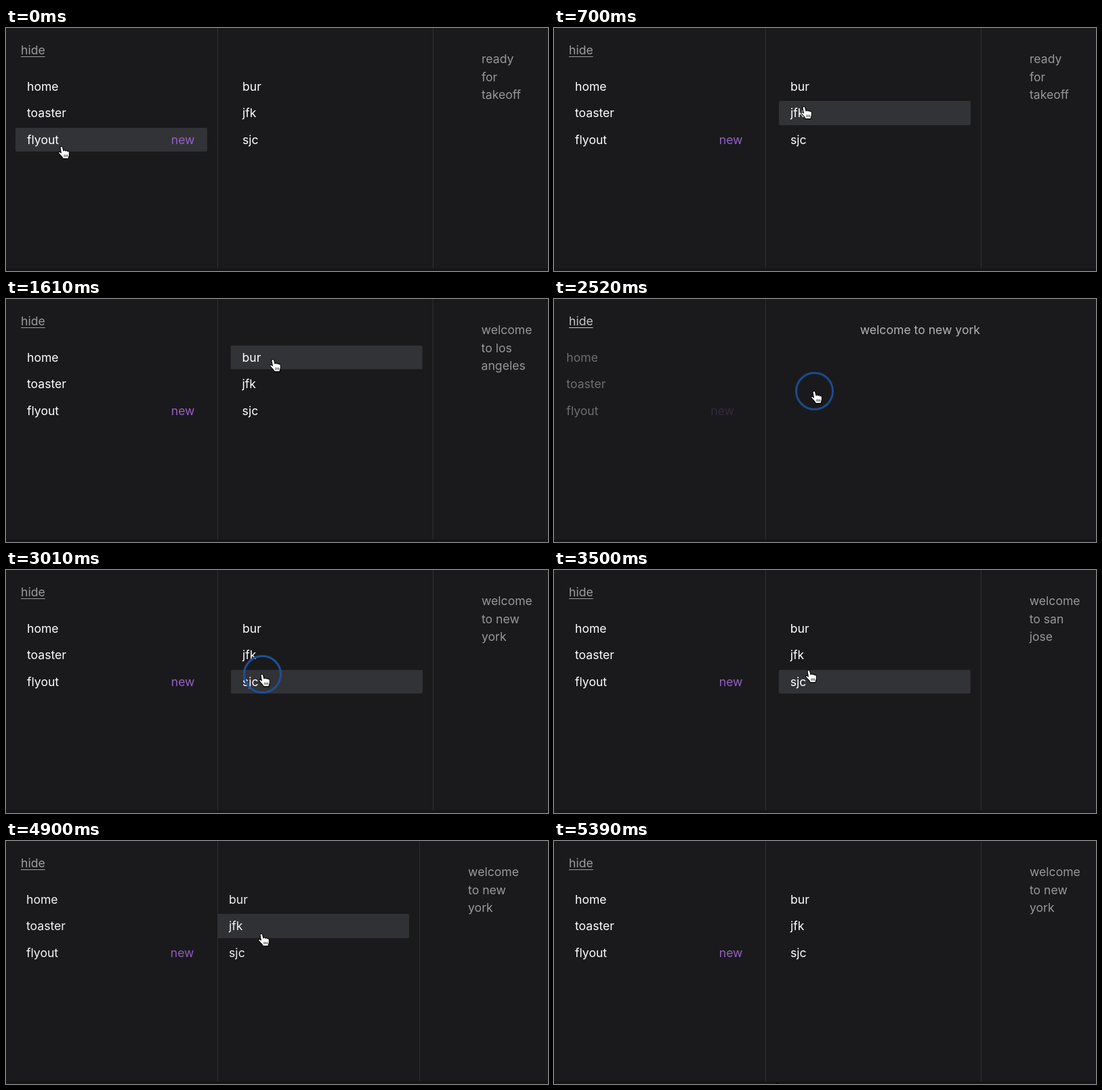
Animation, 800 px wide and 360 px high, one loop 5.46 s. Source, as an HTML page:

```html
<!DOCTYPE html>
<html lang="en">
<head>
<meta charset="utf-8">
<title>Flyout menu</title>
<style>
  html, body { margin: 0; width: 100%; height: 100%; overflow: hidden; background: #1a1a1d; }
  #stage {
    position: relative; width: 800px; height: 360px; overflow: hidden;
    background: #1a1a1d; color: #fff;
    font: 17.6px/26.4px Inter, sans-serif;
  }
  #stage div, #stage svg { position: absolute; }
  #hide { left: 22px; top: 20px; text-decoration: underline; text-underline-offset: 3px; }
  #edge { left: 312px; top: 0; width: 1px; height: 356px; background: #303033; }
  #clip { left: 313px; top: 0; width: 318px; height: 356px; overflow: hidden; }
  #flyout { inset: 0; box-sizing: border-box; border-right: 1px solid #303033; }
  #menu { left: 0; top: 0; width: 312px; height: 356px; }
  .row {
    box-sizing: border-box; width: 282.5px; height: 35.2px; padding: 0 18px 0 17px;
    border-radius: 2px; line-height: 35.2px;
  }
  .row.on { background: #323337; }
  .tag { right: 18px; top: 0; color: #9461c5; }
  #main { top: 33.3px; right: 30px; }
  #foot { left: 0; top: 356px; width: 800px; height: 4px; background: #151517; }
  #ring {
    box-sizing: border-box; width: 57px; height: 57px; margin: -28.5px;
    border: 3.5px solid #1d5098; border-radius: 50%;
  }
  #cursor { left: 0; top: 0; overflow: visible; }
  #cursor path { fill: #fff; stroke: #000; stroke-width: 1.1; stroke-linejoin: round; }
</style>
</head>
<body>
<div id="stage">
  <div id="main"></div>
  <div id="clip"><div id="flyout"></div></div>
  <div id="edge"></div>
  <div id="menu"></div>
  <div id="hide">hide</div>
  <div id="foot"></div>
  <div id="ring"></div>
  <svg id="cursor" width="20" height="22">
    <g id="hand">
      <path d="M-2 1.6C-2.2-.8 1.2-1.2 1.7 1L3 6C3.4 4.6 5.6 4.6 6 6.2C6.6 5 8.4 5.4 8.7 6.8C9.6 6 11.2 6.6 11.3 8.2L11.4 11.5C11.4 13.6 10.2 14.8 10 17.6L2.2 17.6C1.8 15.2-1.8 12.4-4 9.6C-5 8.2-3.2 6.6-1.8 7.8L-.6 9Z"/>
      <path d="M4 11.5V15M6.2 11.5V15M8.4 11.5V15" style="stroke-width:.8"/>
    </g>
    <path id="arrow" d="M0 0V15.5L3.6 12.2L6 17.8L8.5 16.7L6.1 11.3H11Z"/>
  </svg>
</div>
<script>
const LOOP = 5460, SLIDE = 500, PANEL = 317;
const $ = id => document.getElementById(id);

// Each visit: click time and the message it opens.
const visits = [
  [-SLIDE, 'ready for takeoff'],
  [1135, 'welcome to los angeles'],
  [2440, 'welcome to new york'],
  [3020, 'welcome to san jose'],
  [4555, 'welcome to new york']
];

// Pointer tip: time, x, y.
const track = [
  [0, 82, 176], [490, 82, 176], [700, 369, 117], [940, 393, 91], [1050, 394, 90],
  [1680, 394, 90], [2170, 384, 137], [2610, 384, 137], [2900, 378, 155],
  [3400, 378, 155], [3500, 376, 149], [3780, 377, 140], [4060, 377, 140],
  [4200, 377, 138], [5040, 377, 138], [5390, 329, 358], [LOOP, 329, 364]
];

const rows = [];
function addRows(parent, left, names) {
  return names.map((name, i) => {
    const el = document.createElement('div');
    const x = parent === $('flyout') ? left - 313 : left, y = 68.8 + i * 39.65;
    el.className = 'row';
    el.style.left = x + 'px';
    el.style.top = y + 'px';
    el.innerHTML = `<span>${name}</span>`;
    parent.append(el);
    rows.push({ el, left, y, inFlyout: parent === $('flyout') });
    return el;
  });
}
const menuRows = addRows($('menu'), 14, ['home', 'toaster', 'flyout']);
addRows($('flyout'), 332, ['bur', 'jfk', 'sjc']);
const tag = document.createElement('div');
tag.className = 'tag';
tag.textContent = 'new';
menuRows[2].append(tag);
const labels = menuRows.map(el => el.firstChild);

// cubic-bezier(.25, .1, .25, 1)
function ease(x) {
  if (x <= 0) return 0;
  if (x >= 1) return 1;
  const curve = (s, a, b) => 3 * s * (1 - s) * ((1 - s) * a + s * b) + s ** 3;
  let lo = 0, hi = 1;
  for (let i = 0; i < 24; i++) {
    const mid = (lo + hi) / 2;
    if (curve(mid, .25, .25) < x) lo = mid; else hi = mid;
  }
  return curve(lo, .1, 1);
}

function pointer(t) {
  const i = track.findIndex(k => k[0] > t);
  const [t0, x0, y0] = track[i - 1], [t1, x1, y1] = track[i];
  const u = (t - t0) / (t1 - t0), s = u * u * (3 - 2 * u);
  return [x0 + (x1 - x0) * s, y0 + (y1 - y0) * s];
}

function draw(t) {
  const [start, message] = visits.filter(v => v[0] <= t).pop();
  const p = ease((t - start) / SLIDE), rest = 1 - p;
  const [x, y] = pointer(t);

  const main = $('main');
  if (main.textContent !== message) main.textContent = message;
  main.style.left = 702 - PANEL * rest + 'px';
  main.style.color = `rgba(255,255,255,${.55 + .16 * rest})`;
  $('hide').style.color = `rgba(255,255,255,${.57 + .23 * rest})`;

  $('flyout').style.transform = `translateX(${-PANEL * rest}px)`;
  $('flyout').style.opacity = p;
  $('menu').style.transform = rest ? `translateX(${-16 * rest}px)` : 'none';
  labels.forEach(el => el.style.opacity = p ** .65);
  tag.style.opacity = p;

  let over = false;
  for (const r of rows) {
    const left = r.left - (r.inFlyout ? PANEL : 16) * rest;
    const on = x >= left && x < left + 282.5 && y >= r.y && y < r.y + 35.2;
    r.el.classList.toggle('on', on);
    over = over || on;
  }

  const hand = over || p < 1;
  $('hand').style.display = hand ? '' : 'none';
  $('arrow').style.display = hand ? 'none' : '';
  $('cursor').style.transform = `translate(${x}px,${y}px)`;

  // Click ring: quick in, slower out.
  const click = visits.slice(1).find(v => t > v[0] - 60 && t < v[0] + 200);
  const age = click ? t - click[0] : 0;
  const ring = $('ring').style;
  ring.opacity = click ? Math.min(1, (age + 60) / 50, (200 - age) / 130) : 0;
  ring.left = x + .5 + 'px';
  ring.top = y - .5 + 'px';
}

const begin = performance.now();
function tick() {
  draw((performance.now() - begin) % LOOP);
  requestAnimationFrame(tick);
}
tick();
</script>
</body>
</html>
```
